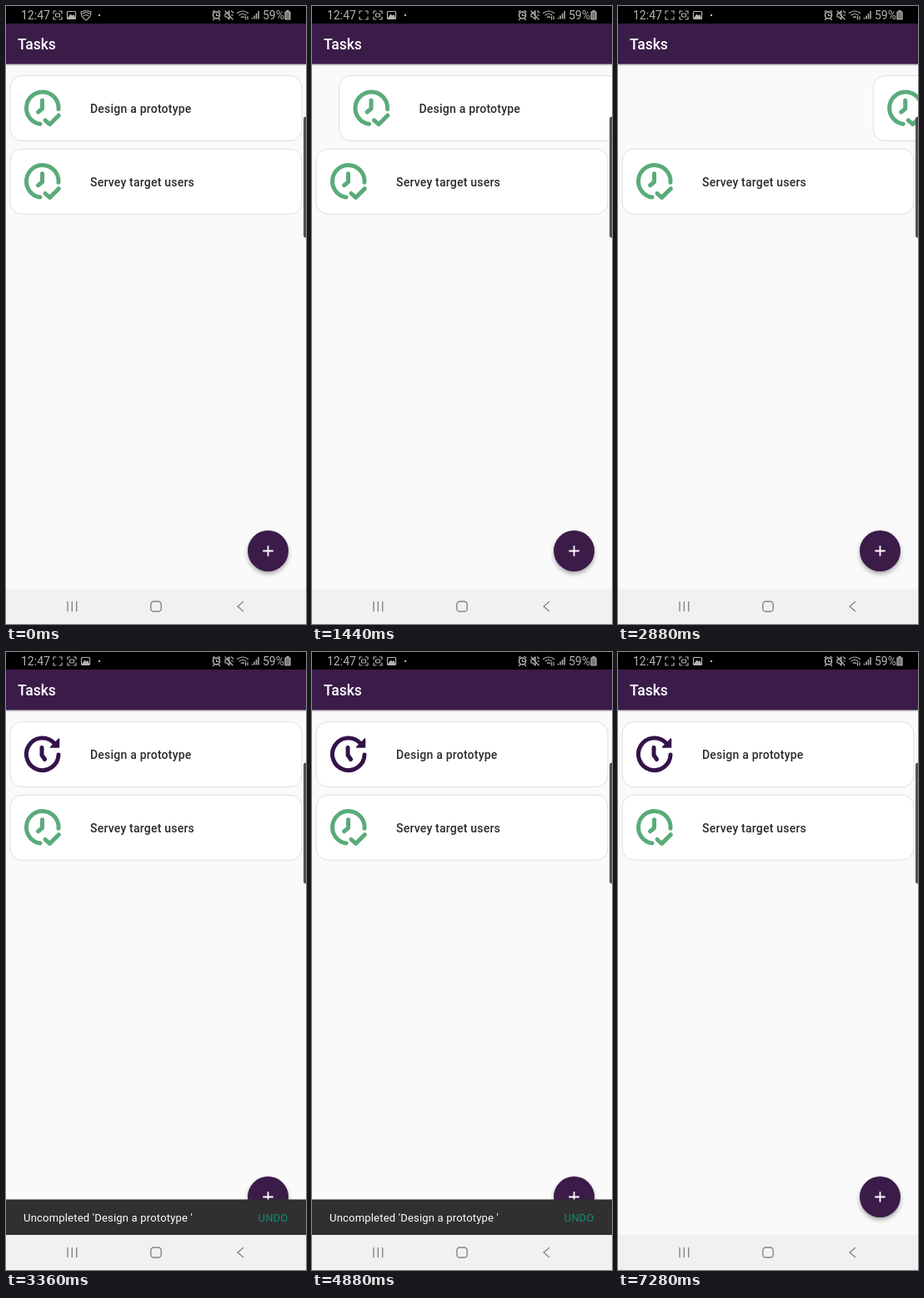
An HTML page that plays this animation: 360x740 px, repeating every 7.36 s.

```html
<!DOCTYPE html>
<html lang="en">
<head>
<meta charset="utf-8">
<title>Tasks</title>
<style>
  html, body { margin: 0; width: 100%; height: 100%; overflow: hidden; background: #fafafa; }
  svg { display: block; width: 360px; height: 740px; font-family: Roboto, sans-serif; }
  .line { fill: none; stroke-linecap: round; stroke-linejoin: round; }
  .card { fill: #fff; stroke: #dfdfdf; }
  .label { font-size: 14px; font-weight: 500; letter-spacing: .22px; fill: #2b2b2b; }
  .snack { font-size: 13px; letter-spacing: .2px; }
  .status { font-size: 14px; fill: #b4b4b4; }
</style>
</head>
<body>
<svg viewBox="0 0 360 740">
  <defs>
    <filter id="shadow" x="-50%" y="-50%" width="200%" height="200%">
      <feDropShadow dx="0" dy="3" stdDeviation="2.5" flood-opacity=".32"/>
    </filter>
    <filter id="barShadow" x="-5%" y="-20%" width="110%" height="150%">
      <feDropShadow dx="0" dy="1" stdDeviation="1.2" flood-opacity=".3"/>
    </filter>
    <clipPath id="content"><rect width="360" height="698"/></clipPath>
    <rect id="cardBox" class="card" x="5" y="83.5" width="350" height="78" rx="14"/>
    <g id="doneIcon" class="line" stroke="#5aab79" stroke-width="5">
      <path d="M41 141.3A19.3 19.3 0 1 1 63 123.5M43.5 113V123L38.5 127M47 136.8L52.5 141.7L63.3 131"/>
    </g>
    <g id="pendingIcon" class="line" stroke="#34134a" stroke-width="5">
      <path d="M63 123A19.3 19.3 0 1 1 57.5 108.8M43 114.5V123.5L46.5 128.5"/>
      <path d="M63.5 104V114H53.5Z" fill="#34134a" stroke-width="1.5"/>
    </g>
    <path id="corners" d="M0 3V0H3M7 0H10V3M10 7V10H7M3 10H0V7"/>
    <rect id="lens" x="2.5" y="3" width="5" height="4" rx="1"/>
  </defs>

  <rect width="360" height="740" fill="#fafafa"/>
  <g clip-path="url(#content)">
    <g id="firstCard">
      <use href="#cardBox"/>
      <use id="done" href="#doneIcon"/>
      <use id="pending" href="#pendingIcon"/>
      <text class="label" x="101" y="128">Design a prototype</text>
    </g>
    <g transform="translate(0 87.7)">
      <use href="#cardBox"/>
      <use href="#doneIcon"/>
      <text class="label" x="101" y="128">Servey target users</text>
    </g>
    <circle cx="314.5" cy="652.5" r="24.5" fill="#3b1a48" filter="url(#shadow)"/>
    <path d="M308.3 652.5H320.7M314.5 646.3V658.7" stroke="#fff" stroke-width="1.8"/>
    <g id="snackbar">
      <rect y="655.5" width="360" height="43" fill="#303030"/>
      <text class="snack" x="21" y="682" fill="#fff">Uncompleted 'Design a prototype '</text>
      <text class="snack" x="302.5" y="682" fill="#158a72">UNDO</text>
    </g>
  </g>

  <rect y="21" width="360" height="48.5" fill="#3b1a48" filter="url(#barShadow)"/>
  <text x="14" y="52" font-size="17.5" font-weight="500" fill="#fff">Tasks</text>

  <rect width="360" height="21" fill="#000"/>
  <text class="status" x="18" y="16">12:47</text>
  <g class="line" stroke="#b4b4b4" stroke-width="1.2">
    <g id="recorder" transform="translate(57 6)">
      <use href="#corners"/><use id="recorderLens" href="#lens"/>
    </g>
    <g id="capture"><use href="#corners"/><use href="#lens"/></g>
    <g id="picture">
      <rect width="10" height="9" rx="1"/>
      <path d="M1 8L4 4L6 6L7.5 4.5L9 8Z" fill="#b4b4b4"/>
    </g>
    <path id="shield" d="M90 7Q96 4.5 102 7Q102 13.5 96 17Q90 13.5 90 7ZM92 9Q96 6.5 100 9M93.5 11.5Q96 10 98.5 11.5"/>
    <circle cx="112" cy="11" r="1.2" fill="#b4b4b4" stroke="none"/>
    <path d="M248 7L250 5.5M257 7L255 5.5M252.5 9V11.5H255M249.5 15.5L248.5 16.5M255.5 15.5L256.5 16.5"/>
    <circle cx="252.5" cy="11" r="4" stroke-width="1.6"/>
    <path d="M263 9H265L268 6V16L265 13H263ZM263 6L272 16M270.5 6L272.5 8M270.5 11H272.5"/>
    <path d="M277.5 8.5Q284 3.5 290.5 8.5M280 11Q284 8 288 11M282.3 13.5Q284 12.3 285.7 13.5M287.5 12.5V16M290 16V12.5"/>
    <path d="M295.5 14V15.5M298 11.5V15.5M300.5 9V15.5M303 6V15.5" stroke-width="1.5" stroke-linecap="butt"/>
    <path d="M335 7H337V5.5H339V7H341V16H335Z" fill="#777"/>
  </g>
  <text class="status" x="308" y="16">59%</text>

  <rect y="698" width="360" height="42" fill="#f1f1f1"/>
  <g class="line" stroke="#858585" stroke-width="1.4">
    <path d="M74 713.5V724.5M79.3 713.5V724.5M84.7 713.5V724.5M284.5 713.5L278 719L284.5 724.5"/>
    <rect x="173.8" y="713" width="12.4" height="12" rx="3.6"/>
  </g>
  <rect x="357" y="132.5" width="8" height="145" rx="3" fill="#515151"/>
</svg>
<script>
  const LOOP = 7360, STEP = 80;
  const RECORDING = 480, SWAP = 3040;
  const swipe = [[1200, 0], [1440, 27.5], [1760, 40], [2320, 48], [2640, 110], [2960, 365]];
  const $ = id => document.getElementById(id);
  const clamp = v => Math.min(1, Math.max(0, v));
  const progress = (t, from, to) => clamp((t - from) / (to - from));
  const smooth = p => p * p * (3 - 2 * p);
  const show = (id, visible) => $(id).setAttribute('visibility', visible ? 'visible' : 'hidden');
  const move = (id, x, y) => $(id).setAttribute('transform', `translate(${x} ${y})`);

  // Each segment adds its own share of the distance.
  const swipeX = t => swipe.slice(1).reduce((x, [end, to], i) => {
    const [start, from] = swipe[i];
    return x + (to - from) * progress(t, start, end);
  }, 0);

  function draw(now) {
    const t = Math.floor(now % LOOP / STEP) * STEP;
    const swapped = t >= SWAP, recording = t >= RECORDING;

    move('firstCard', swapped ? 0 : swipeX(t), 0);
    $('firstCard').setAttribute('opacity', swapped ? progress(t, SWAP - STEP, SWAP + 240) : 1);
    show('done', !swapped);
    show('pending', swapped);

    const raised = smooth(progress(t, 3080, 3360)) - smooth(progress(t, 6120, 6400));
    move('snackbar', 0, 43 * (1 - raised));

    show('recorder', recording);
    show('recorderLens', recording && t >= 4560 && t < 5200);
    show('shield', !recording);
    move('capture', recording ? 74 : 57, 6);
    move('picture', recording ? 90.5 : 73.5, 6.5);
    requestAnimationFrame(draw);
  }
  draw(0);
</script>
</body>
</html>
```
